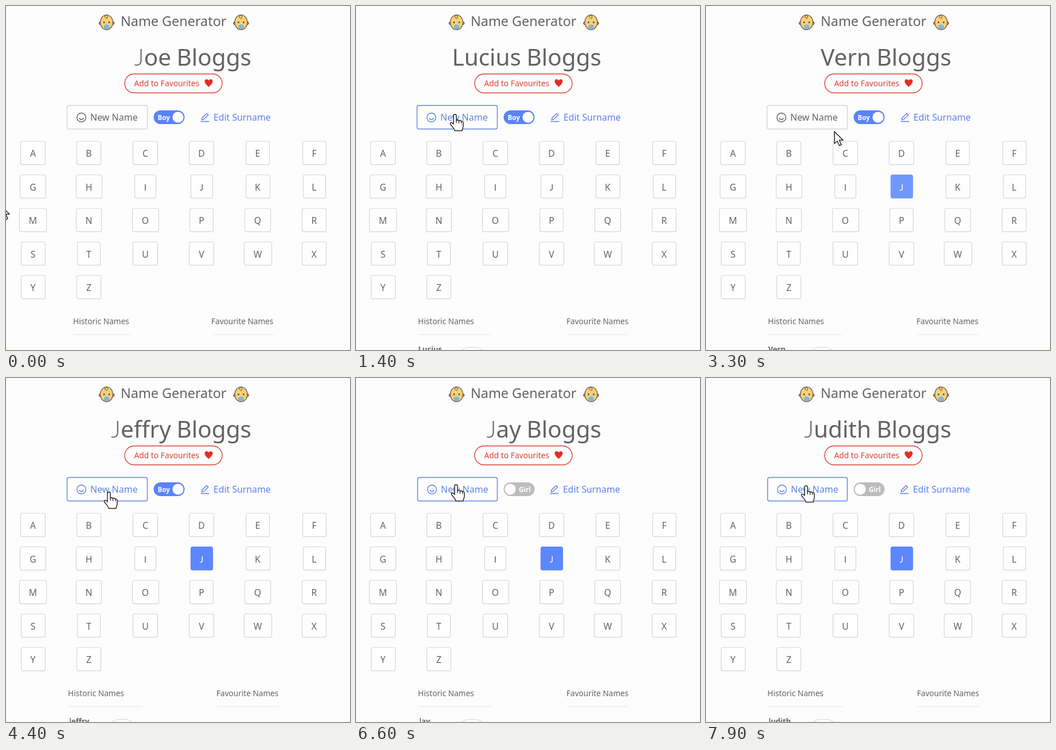
Recreate the animation shown at these times as an HTML page. Size 600x600 px, loop 8000 ms.

```html
<!DOCTYPE html>
<html lang="en">
<head>
<meta charset="utf-8">
<title>Name Generator</title>
<style>
html, body { margin: 0; width: 100%; height: 100%; overflow: hidden; background: #fdfdfe; }
svg { display: block; width: 600px; height: 600px; font-family: "Noto Sans", "Open Sans", sans-serif; }
.plain { font-family: Lato, "Open Sans", sans-serif; }
</style>
</head>
<body>
<svg id="stage" viewBox="0 0 600 600"></svg>
<script>
const LOOP = 8000, STEP = 100;
const INK = '#636365', LINE = '#d6d6da', BLUE = '#5b86e0', RED = '#dc4034';

const names = [[0, 'Joe'], [800, 'Lucius'], [1800, 'Vern'], [3800, 'Jeffry'],
  [4900, 'Jay'], [6900, 'Joanne'], [7500, 'Judith']];
const path = [[0, -9, 348], [600, 173, 189], [1900, 173, 189], [2600, 341, 315], [2900, 341, 315],
  [3300, 224, 219], [3600, 180, 199], [5000, 180, 199], [5500, 288, 195], [6000, 288, 195],
  [6400, 175, 186], [7900, 175, 188]];
const PICK_J = 2800, TO_GIRL = 5900;

const cols = [47, 144.5, 243, 341, 439, 537.5];
const widths = [44, 43, 44, 44, 42, 42, 46, 46, 38, 39, 43, 40, 48, 45, 47, 42, 46, 43,
  43, 41, 44, 44, 49, 43, 43, 43];
const keys = widths.map((w, i) => ({
  ch: String.fromCharCode(65 + i), cx: cols[i % 6],
  x: Math.round(cols[i % 6] - w / 2) + .5, y: 236 + 58.5 * Math.floor(i / 6), w: w - 1, h: 40.5
}));
const newBtn = { x: 106.5, y: 173.5, w: 140, h: 41 };
const toggle = { x: 257.5, y: 182, w: 54, h: 24 };

const clamp = v => Math.max(0, Math.min(1, v));
const mix = (a, b, k) => 'rgb(' + a.map((v, i) => Math.round(v + (b[i] - v) * k)) + ')';
const inside = (b, p) => p.x >= b.x && p.x <= b.x + b.w && p.y >= b.y && p.y <= b.y + b.h;

// I and J take a face without serifs or descender
const text = (s, x, y, size, fill = INK, extra = '') =>
  `<text x="${x}" y="${y}" font-size="${size}" fill="${fill}" ${extra}>${s.replace(/[IJ]/, '<tspan class="plain">$&</tspan>')}</text>`;
const rect = (b, r, fill, stroke, sw = 1.2) =>
  `<rect x="${b.x}" y="${b.y}" width="${b.w}" height="${b.h}" rx="${r}" fill="${fill}" stroke="${stroke}" stroke-width="${sw}"/>`;
const shape = (d, x, y, attrs) => `<path d="${d}" transform="translate(${x} ${y})" ${attrs}/>`;
const line = (x1, x2, y) => `<path d="M${x1} ${y}H${x2}" stroke="#e4e4e8"/>`;

function baby(x) {
  return `<g transform="translate(${x} 28.5)" stroke="#5a5040" stroke-width="1.2">
    <circle cx="-11" cy="1.5" r="2.2" fill="#f3c56b"/><circle cx="11" cy="1.5" r="2.2" fill="#f3c56b"/>
    <ellipse rx="11" ry="13" fill="#f7d07a"/>
    <path d="M-1-8c-4-1-2-5 1-4s2 5-1 6" fill="none" stroke="#8a6a3a"/>
    <circle cx="-4.5" cy="0" r=".9" fill="#5a5040"/><circle cx="4.5" cy="0" r=".9" fill="#5a5040"/>
    <ellipse cy="8" rx="4.4" ry="3.6" fill="#74bdea" stroke="#6aa9d0" stroke-width=".8"/></g>`;
}

function cursorAt(t) {
  let i = path.findIndex(p => p[0] > t);
  if (i < 0) i = path.length;
  const a = path[i - 1], b = path[i] || a;
  const k = b === a ? 0 : (t - a[0]) / (b[0] - a[0]);
  const e = k * k * (3 - 2 * k);
  return { x: a[1] + (b[1] - a[1]) * e, y: a[2] + (b[2] - a[2]) * e };
}

function header(name) {
  return baby(175.5) + baby(410) + text('Name Generator', 200, 35, 23.4) +
    text(name, 288, 104, 40.5, INK, 'text-anchor="end" font-weight="350"') +
    text('Bloggs', 297.5, 104, 40.5, INK, 'font-weight="350"') +
    rect({ x: 207, y: 118.5, w: 170, h: 33 }, 16.5, 'none', RED, 1.4) +
    text('Add to Favourites', 223.5, 140.3, 13.8, RED) +
    shape('M0 6.5C-4 3-7-.2-7-3.2-7-7-2-8 0-4.4 2-8 7-7 7-3.2 7-.2 4 3 0 6.5Z', 353.5, 134.5, 'fill="#e62c20"');
}

function controls(t, p) {
  const girl = t >= TO_GIRL ? 1 : 0, k = clamp((t - TO_GIRL) / 200);
  const hover = inside(newBtn, p);
  const focus = (t >= 800 && t < PICK_J) || (t >= 3800 && t < TO_GIRL);
  const tone = hover || focus ? BLUE : INK;
  const border = hover ? BLUE : focus ? '#93b5ee' : LINE;
  return rect({ ...newBtn, x: newBtn.x + girl, w: newBtn.w - girl }, 3, '#fefefe', border, 1.4) +
    `<g transform="translate(${131.5 + girl} 194.5)" fill="none" stroke="${tone}" stroke-width="1.4">
      <circle r="7.8"/><path d="M-3.6 .8C-2.6 4.6 2.6 4.6 3.6 .8"/></g>` +
    text('New Name', 147 + girl, 200, 16, tone) +
    rect(toggle, 12, mix([89, 131, 250], [188, 188, 190], k), 'none') +
    (girl ? text('Girl', 284, 199, 11.6, '#fff', 'font-weight="600"')
          : text('Boy', 264.5, 199, 11.6, '#fff', 'font-weight="600"')) +
    `<circle cx="${300 - 31 * k}" cy="194" r="9.6" fill="#fff"/>` +
    `<g transform="translate(${339.5 - girl} 187)" fill="none" stroke="#5d80ea" stroke-width="1.4">
      <path d="M0 14.5H15M2 11.5L2.6 8.2 10.6.6 13.2 3.2 5.2 10.9Z"/></g>` +
    text('Edit Surname', 362 - girl, 200, 15.8, '#5d80ea');
}

function letters(t, p) {
  return keys.map(b => {
    const on = b.ch === 'J' && t >= PICK_J, hover = inside(b, p);
    const fill = on ? mix([140, 178, 255], [93, 135, 255], clamp((t - 3000) / 500)) : '#fefefe';
    const edge = on ? fill : hover ? BLUE : LINE;
    const ink = on ? '#fff' : hover ? BLUE : INK;
    return rect({ ...b, y: b.y + 1.5 }, 3, '#f1f1f4', 'none') + rect(b, 3, fill, edge) +
      text(b.ch, b.cx, b.y + 27, 15.8, ink, 'text-anchor="middle"');
  }).join('');
}

function lists(t, name) {
  const d = t < 800 ? 0 : t < 6900 ? 9 : 10;
  const left = 118 - d, right = 359 + d;
  let out = text('Historic Names', left - 1, 555.3, 13.7) + line(left, d ? 228 + d : 218, 573) +
    text('Favourite Names', right - 1, 555.3, 13.6) + line(right, right + 108, 573);
  if (d) {
    const px = d === 10 ? 182.5 : 180.5;
    out += text(name, left - .5, 602.5, 13, INK, 'font-weight="600"') +
      rect({ x: px, y: 595.5, w: 44, h: 32 }, 16, '#fefefe', LINE);
  }
  return out;
}

function pointer(p) {
  const hand = [newBtn, toggle, ...keys].some(b => inside(b, p));
  const d = hand
    ? 'M-3 17V2.5a2.5 2.5 0 0 1 5 0V11c1-2 4-1.5 4.5.5 1-1.5 4-1 4.2 1 1.2-1 3.3-.2 3.3 2V20c0 4-2 5-2 8.5H-1C-1 25-5 22-8 17.5-10 14.5-6.5 12.5-3 17Z'
    : 'M0 0V21L5 16.5 8.5 24.5 12 23 8.5 15H15Z';
  return shape(d, p.x, p.y, 'fill="#fff" stroke="#25252b" stroke-width="1.5" stroke-linejoin="round"') +
    (hand ? shape('M2 11v4M6.5 12v4M10.7 13v3', p.x, p.y, 'stroke="#25252b" stroke-width="1.2"') : '');
}

const stage = document.getElementById('stage');
let shown = -1;

function draw(t) {
  const name = names.filter(n => n[0] <= t).pop()[1], p = cursorAt(t);
  stage.innerHTML = header(name) + controls(t, p) + letters(t, p) + lists(t, name) + pointer(p);
}

const start = performance.now();
function tick() {
  const t = Math.floor((performance.now() - start) % LOOP / STEP) * STEP;
  if (t !== shown) draw(shown = t);
  requestAnimationFrame(tick);
}
tick();
</script>
</body>
</html>
```
